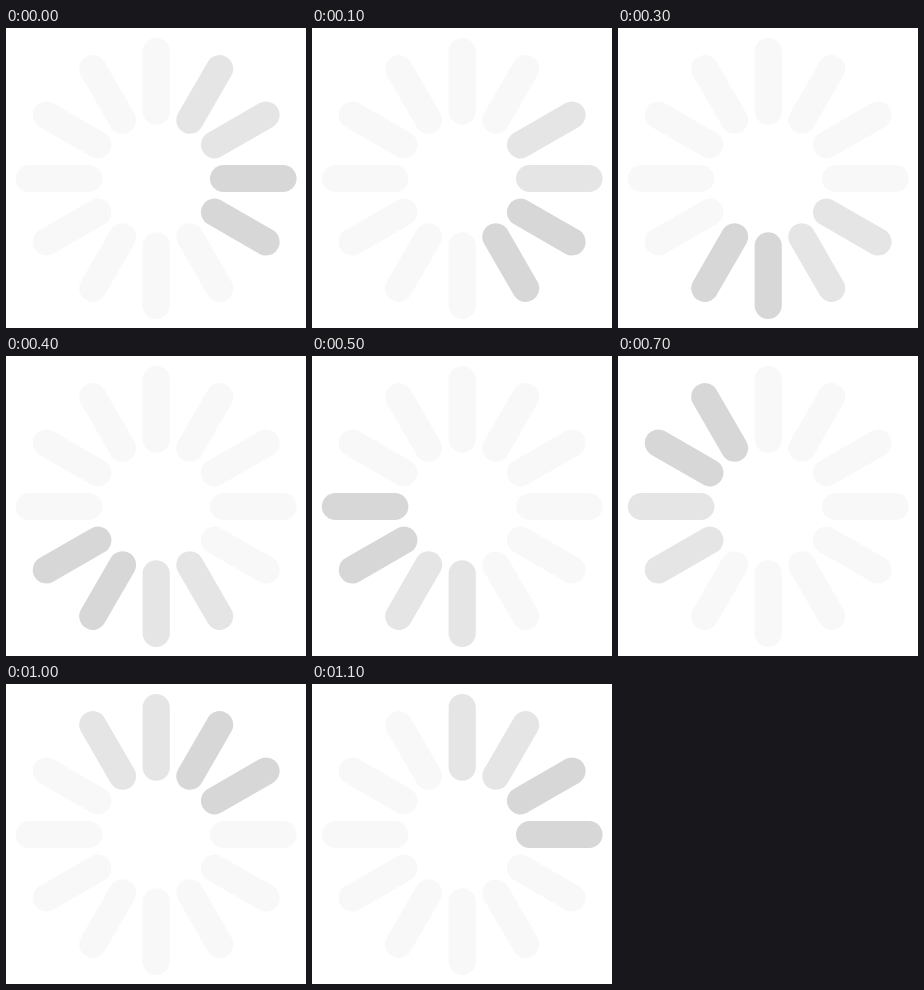
These frames come from a looping animation (300x300 px, 1.2 s). An HTML page:

```html
<!DOCTYPE html>
<html lang="en">
<head>
<meta charset="utf-8">
<title>Loading spinner</title>
<style>
  html, body {
    margin: 0;
    width: 100%;
    height: 100%;
    overflow: hidden;
    background: #fff;
  }
  svg { display: block; width: 100%; height: 100%; }
  .bar {
    stroke: #f8f8f8;
    stroke-width: 27.2;
    stroke-linecap: round;
    transform: rotate(calc(var(--i) * 30deg));
    animation: pulse 1200ms step-end infinite;
    animation-delay: calc(var(--i) * 100ms - 1600ms);
  }
  /* dark for two steps, medium for two, then light */
  @keyframes pulse {
    0% { stroke: #d7d7d7; }
    16.666% { stroke: #e5e5e5; }
    33.333%, 100% { stroke: #f8f8f8; }
  }
</style>
</head>
<body>
<svg viewBox="0 0 300 300">
  <g transform="translate(150.2 150.5)">
    <line class="bar" style="--i:0" y1="-67.4" y2="-126.8"/>
    <line class="bar" style="--i:1" y1="-67.4" y2="-126.8"/>
    <line class="bar" style="--i:2" y1="-67.4" y2="-126.8"/>
    <line class="bar" style="--i:3" y1="-67.4" y2="-126.8"/>
    <line class="bar" style="--i:4" y1="-67.4" y2="-126.8"/>
    <line class="bar" style="--i:5" y1="-67.4" y2="-126.8"/>
    <line class="bar" style="--i:6" y1="-67.4" y2="-126.8"/>
    <line class="bar" style="--i:7" y1="-67.4" y2="-126.8"/>
    <line class="bar" style="--i:8" y1="-67.4" y2="-126.8"/>
    <line class="bar" style="--i:9" y1="-67.4" y2="-126.8"/>
    <line class="bar" style="--i:10" y1="-67.4" y2="-126.8"/>
    <line class="bar" style="--i:11" y1="-67.4" y2="-126.8"/>
  </g>
</svg>
</body>
</html>
```
